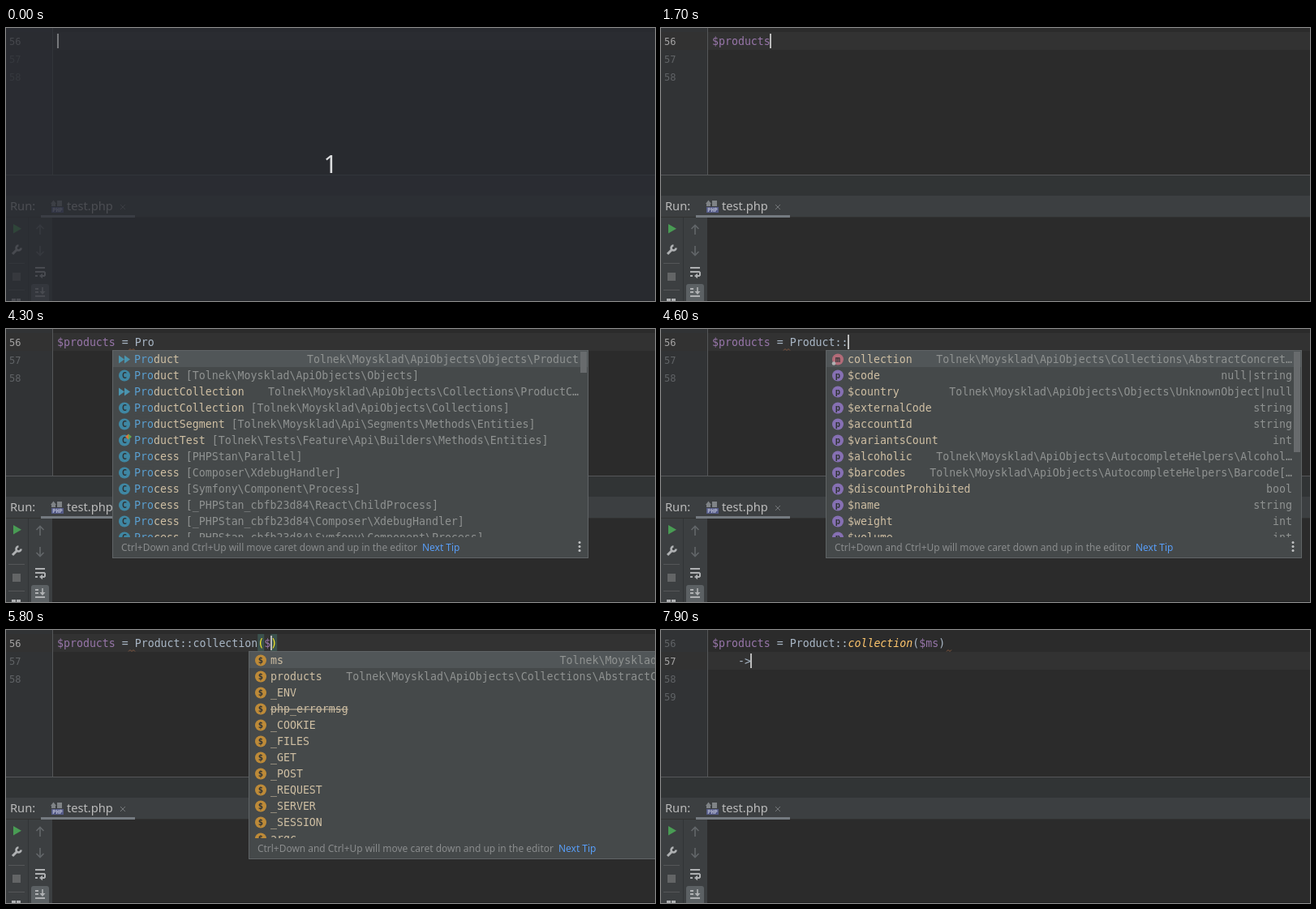
These frames come from a looping animation (800 by 337 pixels, 8000 ms). An HTML page with a canvas:

```html
<!DOCTYPE html>
<html lang="en">
<head>
<meta charset="utf-8">
<style>
  html, body { margin: 0; width: 100%; height: 100%; overflow: hidden; background: #2b2b2b; }
  canvas { display: block; }
</style>
</head>
<body>
<canvas id="stage" width="800" height="337"></canvas>
<script>
const ctx = document.getElementById('stage').getContext('2d');
const LOOP = 8000, CHAR = 7.975, CODE_X = 63;
const MONO = '"DejaVu Sans Mono", monospace', SANS = '"Noto Sans", sans-serif';
const CODE_FONT = `13.25px ${MONO}`;

// Completion lists: [icon, name, right-hand type, inline tail]
const NS = 'Tolnek\\Moysklad\\', API = NS + 'ApiObjects\\';
const globalVar = name => ['$', name, 'array'];
const classRow = (name, space, icon = 'C') => [icon, name, '', `[${space}]`];
const STAN = '_PHPStan_cbfb23d84\\';
const MS = ['$', 'ms', NS + 'MoySklad'];
const DEPRECATED = ['strike', 'php_errormsg', ''];

const variables = [
  MS, ...['_COOKIE', '_ENV', '_GET', '_FILES', '_POST', '_REQUEST', '_SERVER', '_SESSION'].map(globalVar),
  ['$', 'argc', 'int'], ['$', 'argv', 'string[]'], globalVar('GLOBALS'),
];
const classes = [
  ['>>', 'Product', API + 'Objects\\Product'],
  classRow('Product', API + 'Objects'),
  ['>>', 'ProductCollection', API + 'Collections\\ProductC…'],
  classRow('ProductCollection', API + 'Collections'),
  classRow('ProductSegment', NS + 'Api\\Segments\\Methods\\Entities'),
  classRow('ProductTest', 'Tolnek\\Tests\\Feature\\Api\\Builders\\Methods\\Entities', 'T'),
  classRow('Process', 'PHPStan\\Parallel'),
  classRow('Process', 'Composer\\XdebugHandler'),
  classRow('Process', 'Symfony\\Component\\Process'),
  classRow('Process', STAN + 'React\\ChildProcess'),
  classRow('Process', STAN + 'Composer\\XdebugHandler'),
  classRow('Process', STAN + 'Symfony\\Component\\Process'),
];
const members = [
  ['m', 'collection', API + 'Collections\\AbstractConcret…'],
  ['p', '$code', 'null|string'],
  ['p', '$country', API + 'Objects\\UnknownObject|null'],
  ['p', '$externalCode', 'string'],
  ['p', '$accountId', 'string'],
  ['p', '$variantsCount', 'int'],
  ['p', '$alcoholic', API + 'AutocompleteHelpers\\Alcohol…'],
  ['p', '$barcodes', API + 'AutocompleteHelpers\\Barcode[…'],
  ['p', '$discountProhibited', 'bool'],
];
const allMembers = [...members, ['p', '$name', 'string'], ['p', '$weight', 'int'], ['p', '$volume', 'int']];
const fillers = [
  MS, ['$', 'products', API + 'Collections\\AbstractConcreteC…'], globalVar('_ENV'), DEPRECATED,
  ...['_COOKIE', '_FILES', '_GET', '_POST', '_REQUEST', '_SERVER', '_SESSION', 'argc'].map(globalVar),
];

const popup = (x, rows, match = '', indent = 0) => ({ x, rows, match, indent });
const varPopup = popup(43, variables);
const call = 'Product::collection';
const ASSIGN = '$products = ';

// Each step changes part of the state from its time on.
const steps = [
  [0, { code: '', col: 0, row: 0, caret: true, dim: true, squiggles: [] }],
  [100, { dim: false }],
  [300, { caret: false }],
  [500, { code: '$', caret: true }],
  [600, { list: varPopup }],
  [700, { code: '$p' }],
  [900, { code: '$pr', list: popup(29, [DEPRECATED, globalVar('_POST')], 'p', 14) }],
  [1000, { code: '$pro', list: null }],
  [1100, { code: '$prod' }],
  [1300, { code: '$produ' }],
  [1400, { code: '$produc' }],
  [1600, { code: '$product' }],
  [1700, { code: '$products' }],
  [1800, { code: '$products ' }],
  [2100, { squiggles: [[63, 143]] }],
  [2300, { caret: false }],
  [2400, { code: '$products =', caret: true }],
  [2700, { code: ASSIGN, squiggles: [[63, 143], [159, 166]] }],
  [3000, { squiggles: [[151, 159]] }],
  [3300, { code: ASSIGN + 'P' }],
  [3500, { list: popup(115, classes, 'P', 16) }],
  [3600, { code: ASSIGN + 'Pr' }],
  [3700, { list: popup(131, classes, 'Pr') }],
  [3800, { code: ASSIGN + 'Pro', list: popup(131, classes, 'Pro') }],
  [4000, { bulb: true }],
  [4100, { bulb: false }],
  [4300, { caret: false }],
  [4500, { code: ASSIGN + 'Product', caret: true, list: null }],
  [4600, { code: ASSIGN + 'Product::', list: popup(203, allMembers) }],
  [4900, { code: ASSIGN + 'Product::c', list: popup(203, allMembers, 'c') }],
  [5000, { code: ASSIGN + 'Product::co', list: popup(203, members, 'co') }],
  [5200, { bulb: true }],
  [5400, { code: ASSIGN + call + '()', back: 1, brackets: true, list: null, bulb: false }],
  [5700, { code: ASSIGN + call + '($)' }],
  [5800, { list: popup(299, fillers) }],
  [5900, { code: ASSIGN + call + '($m)' }],
  [6000, { code: ASSIGN + call + '($ms)', list: popup(290, [MS, DEPRECATED], 'ms') }],
  [6700, { list: null }],
  [6900, { back: 0 }],
  [7200, { method: true, squiggles: [[352, 358]] }],
  [7400, { brackets: false, row: 1, next: '    ' }],
  [7600, { next: '    -' }],
  [7900, { next: '    ->' }],
];

function rect(color, x, y, w, h) {
  ctx.fillStyle = color;
  ctx.fillRect(x, y, w, h);
}
function text(str, x, y, color, font = CODE_FONT, align = 'left') {
  ctx.font = font;
  ctx.textAlign = align;
  ctx.fillStyle = color;
  ctx.fillText(str, x, y);
}
function line(color, width, ...points) {
  ctx.strokeStyle = color;
  ctx.lineWidth = width;
  ctx.beginPath();
  points.forEach(([x, y]) => ctx.lineTo(x, y));
  ctx.stroke();
}
function polygon(color, ...points) {
  ctx.fillStyle = color;
  ctx.beginPath();
  points.forEach(([x, y]) => ctx.lineTo(x, y));
  ctx.fill();
}
function disc(color, x, y, r) {
  ctx.fillStyle = color;
  ctx.beginPath();
  ctx.arc(x, y, r, 0, 7);
  ctx.fill();
}
const colX = col => CODE_X + col * CHAR;

function drawEditor(s) {
  rect('#2b2b2b', 0, 0, 800, 337);
  rect('#313335', 0, 0, 57, 181);
  rect('#323232', 0, 5 + s.row * 22, 800, 22);
  rect('#555759', 57, 0, 1, 181);
  for (let i = 0; i < 3 + s.row; i++) {
    text(56 + i, 4, 21 + i * 22, i === s.row ? '#a4a3a3' : '#606366', `12px ${MONO}`);
  }

  let col = 0;
  for (const token of s.code.split(/(\$\w*|[()]|collection)/)) {
    const x = colX(col), lit = s.brackets && /[()]/.test(token);
    const named = s.method && token === 'collection';
    if (lit) rect('#3b514d', x, 5, 8, 22);
    const color = lit ? '#ffef28' : named ? '#ffc66d' : token[0] === '$' ? '#9876aa' : '#a9b7c6';
    text(token, x, 21, color, (named ? 'italic ' : '') + CODE_FONT);
    col += token.length;
  }
  if (s.next) text(s.next, CODE_X, 43, '#a9b7c6');

  for (const [from, to] of s.squiggles) {
    const points = [];
    for (let x = from; x <= to; x += 2) points.push([x, (x - from) % 4 ? 24.5 : 26.5]);
    line('#86593f', 1, ...points);
  }
  if (s.caret) {
    const caretCol = s.row ? s.next.length : s.code.length - (s.back || 0);
    rect('#bbbbbb', Math.floor(colX(caretCol)), 7 + s.row * 22, 2, 18);
  }
}

function drawRunPanel() {
  const icon = '#afb1b3', faint = '#63676a';
  rect('#313435', 0, 181, 800, 26);
  rect('#555759', 0, 181, 800, 1);
  rect('#3c3f41', 0, 207, 800, 26);
  rect('#3c3f41', 0, 233, 57, 104);
  rect('#323232', 0, 233, 800, 1);
  rect('#323537', 27, 234, 1, 103);
  text('Run:', 5, 225, '#bbbbbb', `14.67px ${SANS}`);
  text('test.php', 75, 225, '#bbbbbb', `14.67px ${SANS}`);
  rect('#747a80', 43, 231, 116, 3);
  line('#74777a', 1, [141, 218], [147, 224]);
  line('#74777a', 1, [147, 218], [141, 224]);

  polygon('#7f8386', [55, 217], [58.5, 212.5], [62, 217], [61, 217], [61, 220], [56, 220], [56, 217]);
  rect('#7f8386', 63, 213, 6, 7);
  rect('#545a86', 56, 221, 15, 7);
  text('PHP', 63.5, 227.3, '#b5b9d0', `bold 7px ${MONO}`, 'center');

  polygon('#499c54', [9, 242], [19, 247.7], [9, 253.5]);
  line(icon, 3, [8, 279], [14, 273]);
  ctx.lineWidth = 2.6;
  ctx.beginPath();
  ctx.arc(15.5, 271.5, 3, 0, 4.7);
  ctx.stroke();
  rect('#555759', 3, 290, 20, 1);
  rect('#636566', 8, 302, 10, 10);
  rect('#555759', 3, 323, 20, 1);
  rect(icon, 7, 334, 5, 3);
  rect(icon, 13, 334, 5, 3);

  line(faint, 1.6, [42, 255], [42, 244]);
  line(faint, 1.6, [37.5, 248], [42, 243.5], [46.5, 248]);
  line(faint, 1.6, [42, 269], [42, 280]);
  line(faint, 1.6, [37.5, 276], [42, 280.5], [46.5, 276]);

  rect(icon, 36, 295, 12, 2);
  line(icon, 2, [36, 301], [47, 301], [48, 302], [48, 305], [47, 306], [44, 306]);
  polygon(icon, [41, 306], [45, 302.7], [45, 309.3]);
  rect(icon, 36, 305, 3, 2);

  ctx.fillStyle = '#5c6164';
  ctx.beginPath();
  ctx.roundRect(31, 316, 22, 24, 3);
  ctx.fill();
  rect(icon, 36, 321, 4, 2);
  rect(icon, 36, 325, 4, 2);
  rect(icon, 36, 330, 12, 2);
  line(icon, 1.6, [45, 320], [45, 327]);
  polygon(icon, [41.5, 325], [48.5, 325], [45, 329]);
  rect('#202122', 57, 336, 743, 1);
}

const badges = {
  $: ['#bd8a38', '$'], strike: ['#bd8a38', '$'], C: ['#3f87a3', 'C'], T: ['#3f87a3', 'C'],
  m: ['#b26b78', 'm'], p: ['#8670b3', 'p'],
};
function drawIcon(kind, x, y) {
  if (kind === '>>') {
    for (const dx of [-7, 0]) polygon('#4a94ae', [x + dx, y - 5], [x + dx + 7, y], [x + dx, y + 5]);
    return;
  }
  const [color, letter] = badges[kind];
  disc(color, x, y, 7);
  text(letter, x, y + 3.7, '#303436', `bold 10.5px ${MONO}`, 'center');
  if (kind === 'T') {
    polygon('#d9773f', [x + 5, y - 8], [x + 5, y - 1], [x + 1, y - 4.5]);
    polygon('#62a84f', [x + 5, y - 8], [x + 9, y - 4.5], [x + 5, y - 1]);
  }
  if (kind === 'm') disc('#afb1b3', x - 5, y + 5, 2.3);
}

function drawRow([kind, name, type, tail], list, i) {
  const y = 37.5 + i * 20, base = y + 4.5, x = list.x + 27 + list.indent;
  drawIcon(kind, list.x + 15, y);
  const at = name.toLowerCase().indexOf(list.match.toLowerCase()), end = at + list.match.length;
  text(name, x, base, '#cfbfa3');
  if (list.match && at >= 0) {
    text(name.slice(0, at), x, base, '#cfbfa3');
    rect(i ? '#45494a' : '#515658', x + at * CHAR, y - 8, list.match.length * CHAR, 16);
    text(name.slice(at, end), x + at * CHAR, base, '#5a9fd0');
  }
  if (kind === 'strike') rect('#cfbfa3', x, y, name.length * CHAR, 1);
  if (tail) text(tail, x + (name.length + 1) * CHAR, base, '#8f9291');
  if (type) text(type, list.x + 575, base, '#8f9291', CODE_FONT, 'right');
}

function drawPopup(list, bulb) {
  const { x, rows } = list, width = 587;
  const height = Math.min(rows.length * 20, 230), foot = 27 + height;
  rect('#606466', x, 26, width, height + 27);
  rect('#45494a', x + 1, 27, width - 2, height + 25);
  rect('#515658', x + 1, 27, width - 2, 20);

  ctx.save();
  ctx.beginPath();
  ctx.rect(x, 27, width, height);
  ctx.clip();
  rows.forEach((row, i) => drawRow(row, list, i));
  if (rows.length * 20 > height) rect('#686b6d', x + width - 10, 28, 8, rows === classes ? 26 : 124);
  ctx.restore();

  const font = `11.95px ${SANS}`, right = x + width;
  text('Ctrl+Down and Ctrl+Up will move caret down and up in the editor', x + 11, foot + 17, '#8a8c8d', font);
  text('Next Tip', x + 382, foot + 17, '#589df6', font);
  for (const dy of [7, 12, 17]) disc('#c0c2c3', right - 11, foot + dy - 0.5, 1.5);
  if (bulb) {
    disc('#f0a732', right - 31, foot + 10, 5);
    rect('#f0a732', right - 33.5, foot + 13, 5, 3);
    rect('#afb1b3', right - 33, foot + 17, 4, 2);
  }
}

function draw(now) {
  const time = now % LOOP;
  const state = Object.assign({}, ...steps.filter(([at]) => at <= time).map(([, change]) => change));
  drawEditor(state);
  drawRunPanel();
  if (state.list) drawPopup(state.list, state.bulb);
  if (state.dim) {
    rect('rgba(40, 43, 49, 0.76)', 0, 0, 800, 337);
    rect('#76787b', 63, 7, 2, 18);
    text('1', 400, 179, '#dcdddf', `30px ${SANS}`, 'center');
  }
  requestAnimationFrame(draw);
}
requestAnimationFrame(draw);
</script>
</body>
</html>
```
